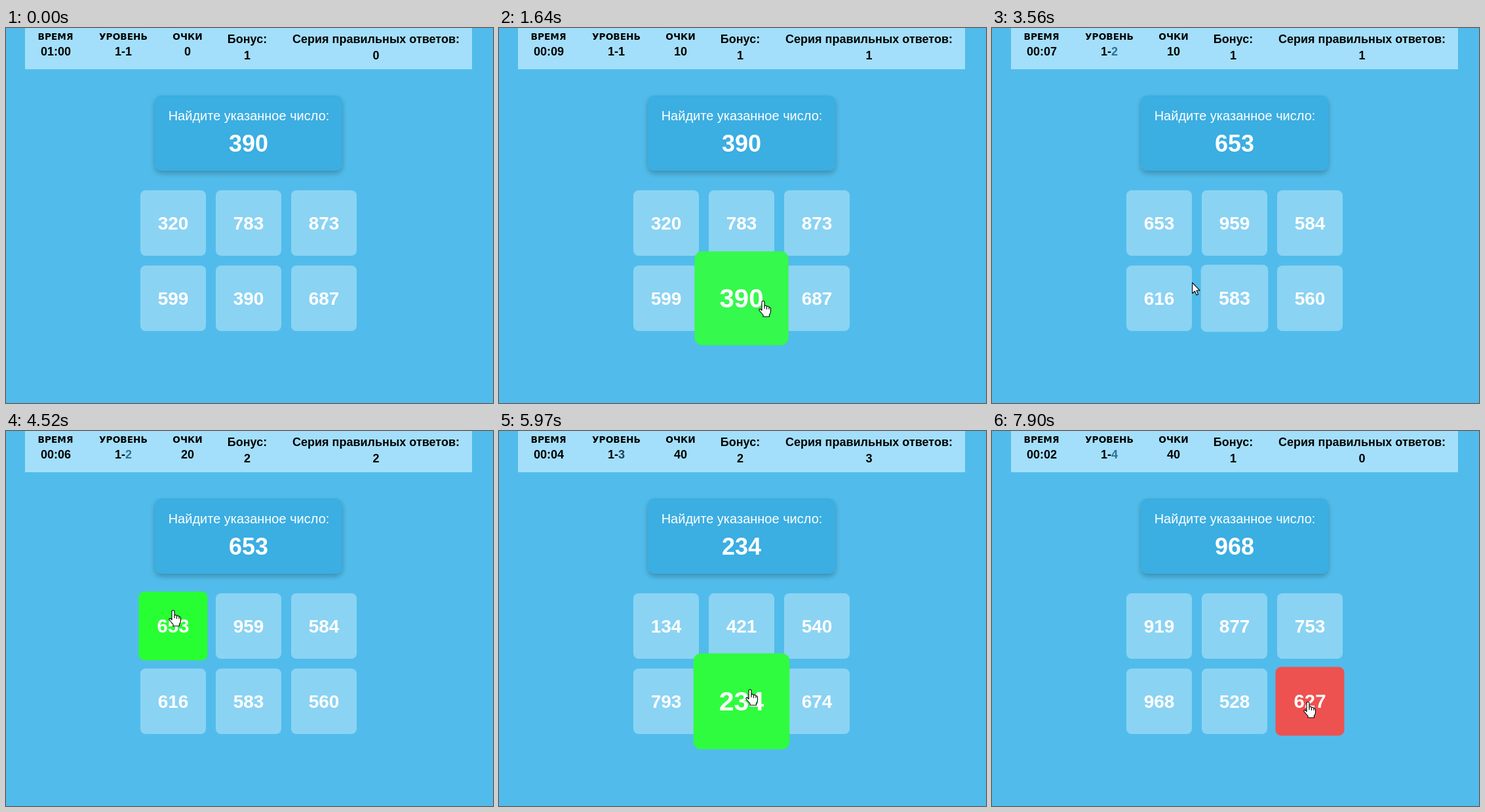
An HTML page for the animation above (8000 ms loop, 743 by 573 pixels).

```html
<!DOCTYPE html>
<html lang="ru">
<head>
<meta charset="utf-8">
<title>Найдите число</title>
<style>
  html, body { margin: 0; width: 100%; height: 100%; overflow: hidden; background: #51bceb; }
  svg { display: block; width: 100vw; height: 100vh; }
  text { font-family: "Liberation Sans", Arial, sans-serif; text-anchor: middle; }
  .bar { font-size: 18px; font-weight: 700; }
  .cap { font-family: "DejaVu Sans", Verdana, sans-serif; font-size: 13.7px; font-weight: 700; }
  .task { font-size: 20px; fill: #fff; }
  .goal { font-size: 36px; font-weight: 700; fill: #fff; }
  .tile text { font-size: 28px; font-weight: 700; fill: #fff; }
  .cursor { fill: #fff; stroke: #000; stroke-width: 1.1; stroke-linejoin: round; }
</style>
</head>
<body>
<svg viewBox="0 0 743 573">
  <defs>
    <filter id="shade" x="-10%" y="-20%" width="120%" height="150%">
      <feDropShadow dx="0" dy="4" stdDeviation="4" flood-color="#000" flood-opacity=".26"/>
    </filter>
  </defs>
  <rect width="743" height="573" fill="#51bceb"/>
  <rect x="29" width="682" height="63" fill="#a3dffa"/>
  <text class="cap" x="75.5" y="18">ВРЕМЯ</text>
  <text class="cap" x="179" y="18">УРОВЕНЬ</text>
  <text class="cap" x="277" y="18">ОЧКИ</text>
  <text class="bar" x="368" y="23">Бонус:</text>
  <text class="bar" x="564.5" y="23">Серия правильных ответов:</text>
  <text class="bar" x="76" y="42" id="time"></text>
  <text class="bar" x="179" y="42">1-<tspan id="level"></tspan></text>
  <text class="bar" x="277" y="42" id="score"></text>
  <text class="bar" x="368" y="48" id="bonus"></text>
  <text class="bar" x="564.5" y="48" id="streak"></text>
  <rect x="227" y="103" width="286" height="115" rx="10" fill="#3aaee2" filter="url(#shade)"/>
  <text class="task" x="370.5" y="141">Найдите указанное число:</text>
  <text class="goal" x="370" y="189" id="goal"></text>
  <g id="board"></g>
  <g class="cursor" id="cursor">
    <path id="arrow" d="M0 0V16.5L3.8 13L6.4 19L9 18L6.4 12H11.5Z"/>
    <g id="hand">
      <path d="M-2 2Q-2 0 0 0T2 2V8Q2 7 4 7.2T5.5 9Q6 8 7.5 8.3T9 10Q11 9 11.5 11.5V16Q11.5 19 9.5 21V24H0V21.5Q-3 18-6 14.5Q-6.5 12-4 12.5L-2 14.5Z"/>
      <path d="M2 8V12M5.5 9V13M9 10V13" fill="none"/>
    </g>
  </g>
</svg>
<script>
const LOOP = 8000, APPEAR = 400, HALF_PULSE = 250;
const BASE = [139, 211, 243], GREEN = [40, 255, 50], RED = [238, 82, 80];

// start: tiles appear; click: time of the answer; pick: index of the clicked tile
const levels = [
  { start: -1000, click: 1498, pick: 4, goal: 390, tint: '#000', nums: [320, 783, 873, 599, 390, 687] },
  { start: 2298, click: 3980, pick: 0, goal: 653, tint: '#2d7096', nums: [653, 959, 584, 616, 583, 560] },
  { start: 4785, click: 5800, pick: 4, goal: 234, tint: '#1c4256', nums: [134, 421, 540, 793, 234, 674] },
  { start: 6622, click: 7750, pick: 5, goal: 968, tint: '#2f6f93', nums: [919, 877, 753, 968, 528, 627] }
];

// time, score, bonus, streak
const results = [[0, 0, 1, 0], [1498, 10, 1, 1], [3980, 20, 2, 2], [5800, 40, 2, 3], [7750, 40, 1, 0]];

// time, x, y of the pointer tip
const path = [
  [120, 612, 575], [750, 500, 450], [1300, 403, 417], [1740, 403, 417],
  [2040, 345, 397], [3140, 345, 397], [3380, 332, 449], [3840, 255, 274],
  [5380, 255, 274], [5720, 383, 395], [6100, 383, 395], [6520, 405, 402],
  [6800, 405, 402], [7250, 477, 402], [7360, 477, 402], [7560, 482, 414]
];

const $ = id => document.getElementById(id);
const clamp = v => Math.min(1, Math.max(0, v));
const lerp = (a, b, k) => a + (b - a) * k;
const lastBefore = (list, t, time) => list.filter(e => time(e) <= t).pop();
const levelAt = t => lastBefore(levels, t, l => l.start);

// CSS "ease" curve
function ease(x) {
  x = clamp(x);
  let lo = 0, hi = 1;
  for (let i = 0; i < 18; i++) {
    const s = (lo + hi) / 2, r = 1 - s;
    if (0.75 * r * s * (r + s) + s * s * s < x) lo = s; else hi = s;
  }
  const r = 1 - lo;
  return 0.3 * r * r * lo + 3 * r * lo * lo + lo * lo * lo;
}

function pointer(t) {
  let i = 0;
  while (i < path.length - 2 && path[i + 1][0] <= t) i++;
  const [t0, x0, y0] = path[i], [t1, x1, y1] = path[i + 1];
  const u = clamp((t - t0) / (t1 - t0)), k = u * u * (3 - 2 * u);
  return [lerp(x0, x1, k), lerp(y0, y1, k)];
}

const center = i => [255 + 115 * (i % 3), 298 + 115 * Math.floor(i / 3)];

function inside(t, i, half) {
  const [px, py] = pointer(t), [cx, cy] = center(i);
  return Math.abs(px - cx) < half && Math.abs(py - cy) < half;
}

// hover eased by averaging the recent past
function hover(t, i, level) {
  let sum = 0;
  for (let k = 0; k < 6; k++) {
    const past = t - k * 25;
    if (past > level.start + APPEAR && inside(past, i, 50)) sum++;
  }
  return sum / 6;
}

function pulse(age) {
  if (age < 0 || age > 2 * HALF_PULSE) return 1;
  return age < HALF_PULSE
    ? lerp(1, 1.5, ease(age / HALF_PULSE))
    : lerp(1.5, 1, ease(age / HALF_PULSE - 1));
}

function make(tag, attrs, parent) {
  const el = document.createElementNS('http://www.w3.org/2000/svg', tag);
  for (const key in attrs) el.setAttribute(key, attrs[key]);
  return parent.appendChild(el);
}

const board = $('board');
const tiles = levels[0].nums.map(() => {
  const g = make('g', { class: 'tile' }, board);
  const rect = make('rect', { x: -50, y: -50, width: 100, height: 100, rx: 8 }, g);
  const text = make('text', { y: 9.5 }, g);
  return { g, rect, text };
});

function put(id, value) {
  if ($(id).textContent !== String(value)) $(id).textContent = value;
}

function drawTile(tile, i, t, level) {
  const [x, y] = center(i), shown = ease((t - level.start) / APPEAR);
  const age = t - level.click, picked = i === level.pick && age >= 0;
  const wrong = level.nums[level.pick] !== level.goal;
  let scale = lerp(0.5, 1, shown) * lerp(1, 1.05, hover(t, i, level));
  let fill = BASE;
  if (picked) {
    if (!wrong) scale = Math.max(scale, pulse(age));
    const k = ease(age / (wrong ? 140 : HALF_PULSE));
    fill = BASE.map((c, n) => Math.round(lerp(c, (wrong ? RED : GREEN)[n], k)));
  }
  tile.g.setAttribute('transform', `translate(${x} ${y}) scale(${scale})`);
  tile.g.setAttribute('opacity', shown);
  tile.rect.setAttribute('fill', `rgb(${fill})`);
  if (tile.text.textContent !== String(level.nums[i])) tile.text.textContent = level.nums[i];
  return inside(t, i, 50 * scale - 2);
}

function draw(t) {
  const level = levelAt(t);
  const [, score, bonus, streak] = lastBefore(results, t, r => r[0]);
  const left = 9 - Math.floor((t - 745) / 1000);
  put('time', t < 120 ? '01:00' : '00:' + String(left).padStart(2, '0'));
  put('level', levels.indexOf(level) + 1);
  $('level').setAttribute('fill', level.tint);
  put('score', score);
  put('bonus', bonus);
  put('streak', streak);
  put('goal', level.goal);

  const over = tiles.map((tile, i) => drawTile(tile, i, t, level)).some(Boolean);
  const top = tiles[level.pick].g;
  if (board.lastChild !== top) board.appendChild(top);

  const [x, y] = pointer(t);
  $('cursor').setAttribute('transform', `translate(${x} ${y})`);
  $('cursor').setAttribute('display', t < 120 ? 'none' : 'inline');
  $('hand').setAttribute('display', over ? 'inline' : 'none');
  $('arrow').setAttribute('display', over ? 'none' : 'inline');
}

const begin = performance.now();
function tick() {
  draw((performance.now() - begin) % LOOP);
  requestAnimationFrame(tick);
}
tick();
</script>
</body>
</html>
```
